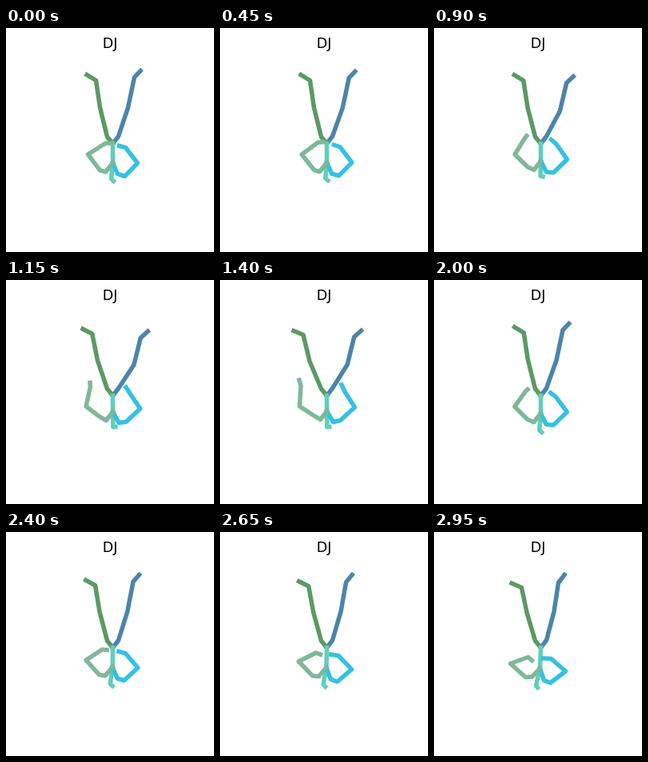
Recreate the animation shown at these times as an HTML page with a canvas. Size 260 by 280 pixels, loop 3000 ms.

```html
<!DOCTYPE html>
<html lang="en">
<head>
<meta charset="utf-8">
<title>DJ</title>
<style>
  html, body { margin: 0; width: 100%; height: 100%; overflow: hidden; background: #fff; }
  canvas { display: block; }
</style>
</head>
<body>
<canvas id="stage" width="260" height="280"></canvas>
<script>
const ctx = document.getElementById('stage').getContext('2d');
const LOOP = 3000, STEP = 50, SINK_START = 1700, SINK_END = 2950;

// A joint rests at x, y; lift is its offset at the top of the swing,
// sink its offset at the end of the loop.
const joint = (x, y, lift = [0, 0], sink = [0, 0]) => ({ x, y, lift, sink });

const root = joint(133, 144);
const chest = joint(133, 168, [0, -4.5], [-1, 2]);

// peak and width (ms) time the swing of each limb.
const limbs = [
  { color: '#4d84aa', peak: 1230, width: 500, joints: [
    root,
    joint(140, 135),
    joint(152, 99, [7.5, 7], [-2.5, 0]),
    joint(160, 61, [8, 11], [-5, 2]),
    joint(167.5, 53, [9.5, 11], [-5, 0])
  ] },
  { color: '#5b9965', peak: 1380, width: 300, joints: [
    root,
    joint(126, 135.5),
    joint(117, 99, [-5.5, 2], [-1.5, 1]),
    joint(112, 65, [-8.5, 3], [-3, 4]),
    joint(100.5, 58, [-9, 5], [-4, 5.5])
  ] },
  { color: '#61ceb9', peak: 1250, width: 550, joints: [
    root,
    chest,
    joint(131, 188, [2.5, -5], [-4, 3.5]),
    joint(134, 191, [2.5, -8.5], [-5, 3])
  ] },
  { color: '#34c1e2', peak: 1430, width: 620, joints: [
    chest,
    joint(139, 182, [2, -5], [-2, 3]),
    joint(148, 185, [2, -10], [-3, 3]),
    joint(164, 168.5, [4, -10], [0, 5]),
    joint(149, 149, [7, -9], [-3, 9]),
    joint(141, 147, [10.5, -16.5], [-5, 10.5])
  ] },
  { color: '#80b79a', peak: 1430, width: 620, joints: [
    chest,
    joint(124, 179.5, [1, -5.5], [-2, 1]),
    joint(117, 177.5, [-1, -9], [-3, 3.5]),
    joint(102, 157.5, [-3, 0], [-7, 6.5]),
    joint(124, 143.5, [-23.5, -12], [-7, 12.5]),
    joint(131, 143.5, [-32.5, -19], [-9, 16.5])
  ] }
];

function drawLimb({ color, peak, width, joints }, t) {
  const swing = Math.exp(-(((t - peak) / width) ** 2));
  const fall = Math.max(0, (t - SINK_START) / (SINK_END - SINK_START)) ** 2;
  ctx.strokeStyle = color;
  ctx.beginPath();
  for (const { x, y, lift, sink } of joints) {
    ctx.lineTo(x + swing * lift[0] + fall * sink[0], y + swing * lift[1] + fall * sink[1]);
  }
  ctx.stroke();
}

function draw(t) {
  ctx.setTransform(1, 0, 0, 1, 0, 0);
  ctx.fillStyle = '#fff';
  ctx.fillRect(0, 0, 260, 280);

  ctx.fillStyle = '#000';
  ctx.font = '17.5px "DejaVu Sans", sans-serif';
  ctx.textAlign = 'center';
  ctx.fillText('DJ', 130, 24.5);

  ctx.translate(0.5, 0.5);
  ctx.lineWidth = 5.5;
  ctx.lineCap = 'square';
  ctx.lineJoin = 'round';
  limbs.forEach(limb => drawLimb(limb, t));
}

const start = performance.now();
function tick() {
  const t = (performance.now() - start) % LOOP;
  draw(Math.floor(t / STEP) * STEP);
  requestAnimationFrame(tick);
}
tick();
</script>
</body>
</html>
```
